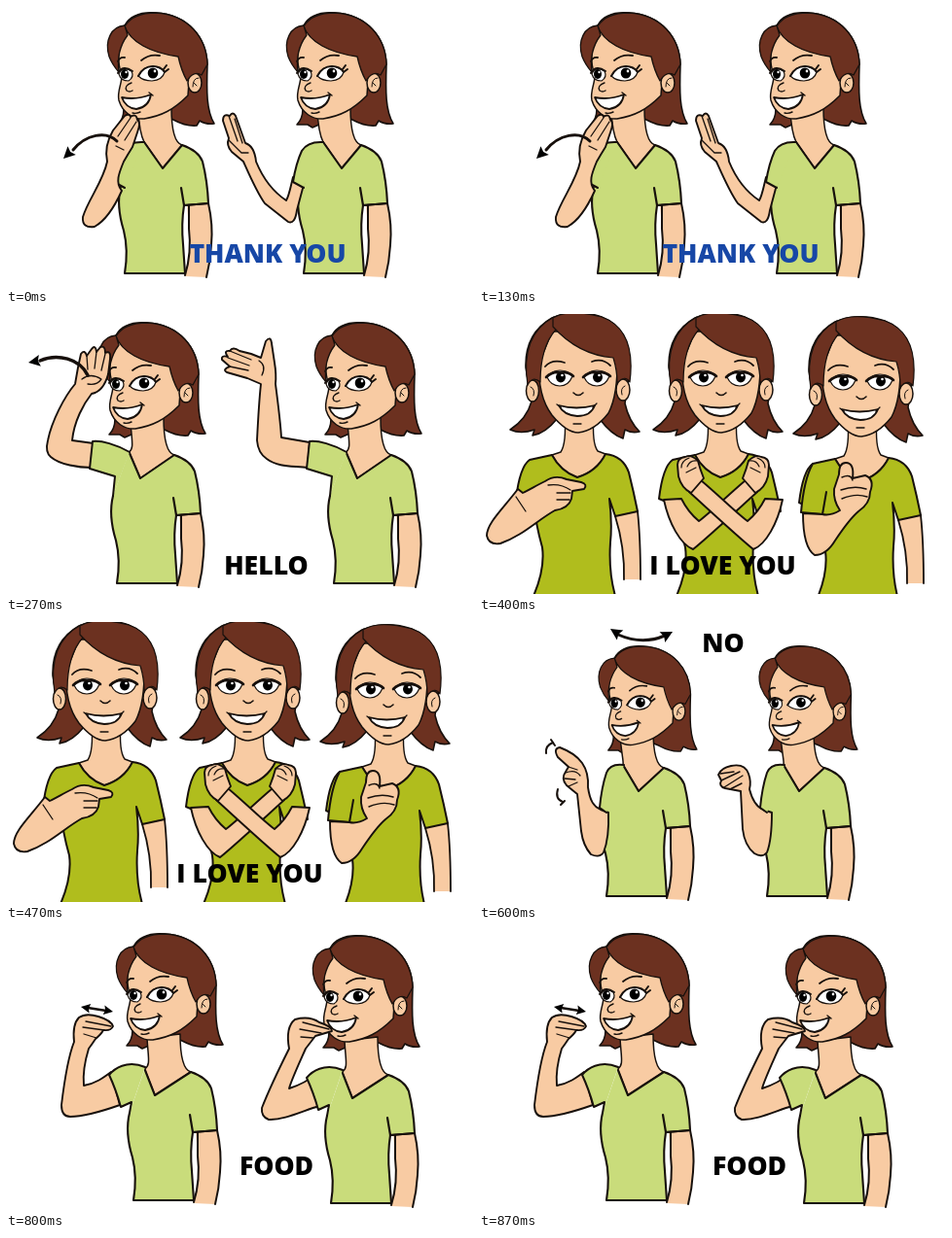
These frames come from a looping animation (480x288 px, 0.99 s). An HTML page:

```html
<!DOCTYPE html>
<html lang="en">
<head>
<meta charset="utf-8">
<title>Sign language words</title>
<style>
html, body { margin: 0; width: 100%; height: 100%; overflow: hidden; background: #fff; }
svg { display: block; width: 480px; height: 288px; }
text { font: 800 26.6px "Open Sans", sans-serif; text-anchor: middle; }
</style>
</head>
<body>
<svg id="stage" viewBox="0 0 480 288" stroke-linejoin="round" stroke-linecap="round"></svg>
<script>
const INK = '#17100c', SKIN = '#f8cba3', HAIR = '#6c3120', LIME = '#c9dc7b', OLIVE = '#b0bd1d';

const path = (d, fill = 'none', w = 1.6) =>
  `<path d="${d}" fill="${fill}" stroke="${INK}" stroke-width="${w}"/>`;
const oval = (x, y, rx, ry, fill, w = 0) =>
  `<ellipse cx="${x}" cy="${y}" rx="${rx}" ry="${ry}" fill="${fill}" stroke="${INK}" stroke-width="${w}"/>`;
const at = (x, y, body, sx = 1, sy = 1) =>
  `<g transform="translate(${x} ${y}) scale(${sx} ${sy})">${body}</g>`;
const label = (s, x, y, fill = '#000', style = '') =>
  `<text x="${x}" y="${y}" fill="${fill}" style="${style}">${s}</text>`;
const head = (x, y, deg) =>
  `<path d="M0 0L-12 -6L-10 0L-12 6Z" transform="translate(${x} ${y}) rotate(${deg})"/>`;
const limb = d => path(d, SKIN, 1.9);

// Three-quarter view
const hairBack = path('M122 20C128 9 140 6 154 7C187 9 206 32 207 60C206 88 206 108 214 121Q205 122 199 118L196 123Q185 124 172 117L150 108L140 121L131 125L126 122L115 122Q121 116 121 106L125 80L150 30Z', HAIR);
const sideFace =
  path('M123 27C113 42 115 60 119 72C119 80 114 88 116 97C120 110 131 117 142 116C160 113 172 107 187 92L190 50L150 25Z', SKIN, 1.5) +
  oval(194, 79, 7, 10, SKIN, 1.5) + path('M192 83Q192 74 198 74M193 79L196 82', 'none', 1) +
  path('M122 21C128 37 148 48 177 52Q180 66 186 77Q193 66 201 71L207 60C206 32 187 9 154 7Q130 7 122 21Z', HAIR, 1.3) +
  path('M122 20C108 21 101 36 106 52Q109 60 116 68Q113 46 125 30Z', HAIR, 1.3) +
  path('M139 56Q147 49 158 51M115 57Q117 52 122 53', 'none', 1.8) +
  path('M116 70Q120 61 129 67Q132 73 126 77Q118 77 116 70Z', '#fff', 1.2) +
  path('M136 72Q141 62 151 62Q160 63 163 68Q161 76 150 77Q141 77 136 72Z', '#fff', 1.2) +
  oval(122, 70, 4, 5, '#000') + oval(151, 69, 5.3, 5.6, '#000') +
  oval(123.5, 68, 1.1, 1.2, '#fff') + oval(153, 67, 1.3, 1.4, '#fff') +
  path('M115 69Q120 60 130 67M136 72Q141 62 151 62Q159 62 163 68L167 65M162 65L165 61', 'none', 2) +
  path('M129 79Q121 82 124 87Q127 89 130 87', 'none', 1.4) +
  path('M119 94Q134 97 149 91Q147 104 134 106Q123 105 119 94Z', '#fff', 1.8) +
  path('M147 89L151 92M130 110Q134 111 138 109', 'none', 1.4);

const sideBody = v => {
  const x = 142 + v / 2;
  return path('M186 204L208 203Q213 225 211 246Q210 263 206 279L184 278Q191 254 188 229Z', SKIN, 0) +
    path('M208 203Q213 225 211 246Q210 263 206 279M184 277Q191 254 188 229V205', 'none', 2) +
    path(`M136 108C137 128 140 136 ${x} 140L${161 + v} 167L181 143Q170 140 170 104Z`, SKIN, 1.5) +
    path(`M${x} 140L${161 + v} 167L181 143Q198 149 202 160Q207 180 208 203L183 205Q180 224 182 245L184 275H122Q126 251 121 231Q113 205 118 185`, LIME, 2.1) +
    path('M180 187L183 205L208 203', 'none', 2.2);
};

// [head x, y, sx, sy], [body x, y, neckline shift]
const side = (h, b, front) =>
  at(h[0], h[1], hairBack, h[2], h[3]) + at(b[0], b[1], sideBody(b[2])) +
  at(h[0], h[1], sideFace, h[2], h[3]) + front;

// Front view
const eye = x =>
  path(`M${x - 13} 65Q${x - 8} 58 ${x} 58Q${x + 9} 58 ${x + 13} 64Q${x + 9} 74 ${x} 74Q${x - 9} 74 ${x - 13} 65Z`, '#fff', 1.2) +
  oval(x + 1, 65, 5, 5.4, '#000') + oval(x + 2.5, 63, 1.3, 1.3, '#fff') +
  path(`M${x - 14} 65Q${x - 8} 59 ${x} 60Q${x + 9} 59 ${x + 14} 64`, 'none', 2.6);
const frontHead =
  path('M75 4Q100 -6 126 3C149 12 156 32 155 58L150 92Q154 110 165 121Q157 123 150 119L148 128Q136 124 124 108H80Q68 123 55 125L57 119Q43 124 32 119Q49 108 54 90L48 55Q47 20 75 4Z', HAIR) +
  path('M88 105Q90 133 84 142L75 145Q84 162 101 168Q121 162 130 144L122 141Q116 133 118 105Z', SKIN, 1.4) +
  oval(55, 79, 6.5, 11, SKIN, 1.5) + oval(148, 78, 7, 11, SKIN, 1.5) +
  path('M53 75Q58 77 56 84M150 74Q145 76 147 83', 'none', 1) +
  path('M62 50Q60 84 75 104Q90 122 102 122Q119 120 133 102Q143 83 142 45L100 18H75Z', SKIN, 1.5) +
  path('M79 16Q63 34 63 70Q55 63 50 73Q42 22 77 3Z', HAIR, 1.2) +
  path('M76 13Q102 42 138 45Q142 58 142 71Q150 62 155 70Q162 16 126 3Q92 -6 76 4Z', HAIR, 1.2) +
  path('M68 54Q75 46 88 50M116 49Q127 45 135 53', 'none', 1.8) + eye(83) + eye(121) +
  path('M97 81Q102 86 107 81', 'none', 1.6) +
  path('M82 94Q100 99 119 94Q115 105 101 105Q87 104 82 94Z', '#fff', 1.8) +
  path('M80 93L84 96M117 96L121 92M97 113H105', 'none', 1.3);

const frontBody = path('M75 145Q84 162 101 168Q121 162 130 144Q148 146 154 163Q159 183 163 203L140 208L134 190Q137 215 135 235Q133 265 140 290H56Q68 262 65 240Q58 215 57 198L38 190Q42 157 52 150Z', OLIVE, 2);
const hangArm = path('M140 208L163 203Q166 230 166 273H149Q150 240 140 208Z', SKIN, 0) +
  path('M163 203Q166 230 166 273M149 273Q150 240 140 208', 'none', 1.8);
const front = (x, y, arm) => at(x, y, (arm ? hangArm : '') + frontHead + frontBody);

const sleeveDown = path('M142 140Q126 139 120 149Q114 162 111 181L122 187', LIME, 2);
const sleeveUp = path('M127 142C113 134 98 130 89 131L86 159L112 167L110 187', LIME, 2);
const sleeveFood = path('M143 141C124 133 111 143 106 149Q113 164 118 182L129 177L127 188', LIME, 2);
const sleeveNo = path('M149 147Q135 145 131 155Q126 170 124 191L131 196', LIME, 2);

const thanks =
  side([0, 0], [0, 0, 0],
    sleeveDown +
    limb('M104 160C102 150 104 138 110 128L122 113Q127 110 128 114Q134 110 135 117Q139 120 135 130L130 145Q125 153 121 160C116 172 112 182 119 190C110 210 100 222 91 227Q78 229 79 217C84 200 100 180 104 160Z') +
    path('M128 115L115 134M134 119L122 138M113 144L121 148', 'none', 1.3) +
    path('M114 139C103 128 82 132 69 148', 'none', 3) + head(59, 157, 136)) +
  side([184, 0], [184, 0, 0],
    limb('M295 176C292 188 291 195 288 200C273 190 264 177 257 160C256 150 252 143 246 141L236 113Q233 108 230 113Q223 110 223 118L229 136Q226 143 232 150L244 160C252 178 258 192 266 203L290 222Q297 225 299 210L307 180Z') +
    path('M229 113L238 139M235 116L243 141M229 138L242 151L249 151', 'none', 1.3) +
    at(184, 0, sleeveDown)) +
  label('THANK YOU', 269, 264, '#1747a6');

const hello =
  side([-9, 2], [-8, 2, -15],
    limb('M88 158C75 158 55 155 46 147Q40 142 43 130C47 110 60 85 71 72L74 55L77 41Q81 36 83 43L88 36Q92 31 93 39L97 34Q102 32 102 40Q108 37 107 46L105 62Q100 80 88 82C80 92 70 110 68 130L90 133Z') +
    path('M83 43L84 57M93 39L91 56M102 41L98 58M78 67Q87 60 98 67Q93 74 84 72', 'none', 1.3) + sleeveUp +
    path('M84 63C76 46 53 40 35 48', 'none', 3.5) + head(23, 50, 170)) +
  side([213, 2], [215, 2, -15],
    limb('M310 158C295 156 280 158 268 149Q259 143 258 130C259 110 260 90 262 72L248 66L227 60Q222 57 230 54L222 47Q221 42 228 44Q223 37 230 38Q233 33 240 38L252 41L262 45L267 28Q272 22 273 30L276 50Q278 62 277 72C280 95 282 110 283 127L312 132Z') +
    path('M230 54L249 58M228 45L250 53M230 38L252 47M260 48Q268 53 263 63', 'none', 1.3) + at(223, 0, sleeveUp)) +
  label('HELLO', 267.5, 268);

const crossArm = limb('M190 191C195 215 207 237 220 242C235 230 265 202 286 183L274 171C255 187 237 205 226 213Q215 204 208 190Z') +
  limb('M271 169Q275 159 277 151Q284 144 290 147Q298 148 298 155L297 167Q294 179 284 184Z') +
  path('M278 151Q285 150 288 157M286 148Q294 151 294 158M279 158L289 163', 'none', 1.2);
const love =
  front(0, 0, true) +
  limb('M40 180C25 200 8 215 8 228Q10 238 22 236C45 228 60 212 78 202Q92 200 95 190L96 182L108 180Q112 175 105 173L90 170Q78 165 68 172C59 176 52 181 45 184Z') +
  path('M71 176Q84 174 94 181M80 184L94 184M80 191L93 191M38 188L48 203', 'none', 1.3) +
  front(147, 0, false) + crossArm + at(502, 0, crossArm, -1, 1) +
  front(291, 4, true) +
  path('M343 154Q334 170 331 204L353 206L357 183', OLIVE, 2) +
  limb('M333 205C333 225 336 242 345 248Q357 248 366 233C376 218 383 209 390 203Q402 195 402 183Q407 170 397 166L384 169Q386 153 377 153Q370 153 370 165L365 180Q364 192 371 202Q361 208 353 206Z') +
  path('M373 168Q382 164 384 171M372 181Q386 176 398 180M373 190Q387 184 399 188', 'none', 1.4) +
  label('I LOVE YOU', 250.5, 268);

const no =
  side([27, 18.5, .92, .93], [9, 7, -6],
    limb('M101 177L90 168Q84 161 89 154L92 149L81 139Q76 130 83 129Q99 135 106 145Q113 155 112 170C114 184 118 190 125 193L133 196Q134 222 128 237Q124 243 115 239Q107 230 105 215Z') +
    path('M92 149L101 152M89 155Q99 151 104 158M88 161L99 162M92 169L101 165', 'none', 1.3) + sleeveNo +
    path('M69 135Q68 127 76 124M81 172Q78 182 86 185', 'none', 2) +
    path('M74 121L78 127M84 188L88 184', 'none', 2)) +
  side([192, 18.5, .92, .93], [174, 7, -6],
    limb('M269 174L253 171Q246 169 249 163L246 157Q249 150 259 148Q273 145 277 156Q280 164 278 172C281 184 285 190 292 193L301 196Q301 224 296 237Q291 243 283 238Q273 230 271 213Z') +
    path('M249 163L268 154M252 170L271 158M258 172L270 166M248 156L262 154', 'none', 1.4) + at(165, 0, sleeveNo)) +
  path('M143 13Q168 24 191 14', 'none', 3) + head(135, 7, 213) + head(199, 10, -28) +
  label('NO', 251, 31, '#000', 'font:700 24px "DejaVu Sans",sans-serif');

const food =
  side([9, -3], [9, 3, -17],
    limb('M117 180C100 186 80 192 66 192Q57 192 57 180C60 155 64 130 70 115Q68 97 75 90Q82 85 95 89Q108 93 110 99Q108 104 100 103Q98 107 92 112Q88 118 85 122C81 135 79 150 80 160C92 158 100 152 108 146Z') +
    path('M82 94L108 99M79 100L101 103M80 107L93 111', 'none', 1.3) + sleeveFood +
    path('M84 80L103 83', 'none', 2.6) + at(77, 79, head(0, 0, 190), .8, .8) + at(110, 84, head(0, 0, 10), .8, .8)) +
  side([211, -1], [212, 6, -17],
    limb('M322 181C305 186 285 196 270 195Q262 192 263 183C270 165 282 140 291 122Q287 100 297 92Q312 88 322 95Q335 99 335 104Q325 107 318 109L308 122C300 140 293 155 291 163C300 160 310 156 315 150Z') +
    path('M305 95L332 102M302 102L324 106M303 110L316 111', 'none', 1.3) + at(203, 3, sleeveFood)) +
  label('FOOD', 278, 252);

const stage = document.getElementById('stage');
stage.innerHTML = [thanks, hello, love, no, food].map(s => `<g>${s}</g>`).join('');
const slides = [...stage.children];

const LOOP = 990, HOLD = 200;
function draw(ms) {
  const now = Math.floor(ms % LOOP / HOLD);
  slides.forEach((g, i) => g.setAttribute('display', i === now ? 'inline' : 'none'));
}
const start = performance.now();
function tick() {
  draw(performance.now() - start);
  requestAnimationFrame(tick);
}
tick();
</script>
</body>
</html>
```
